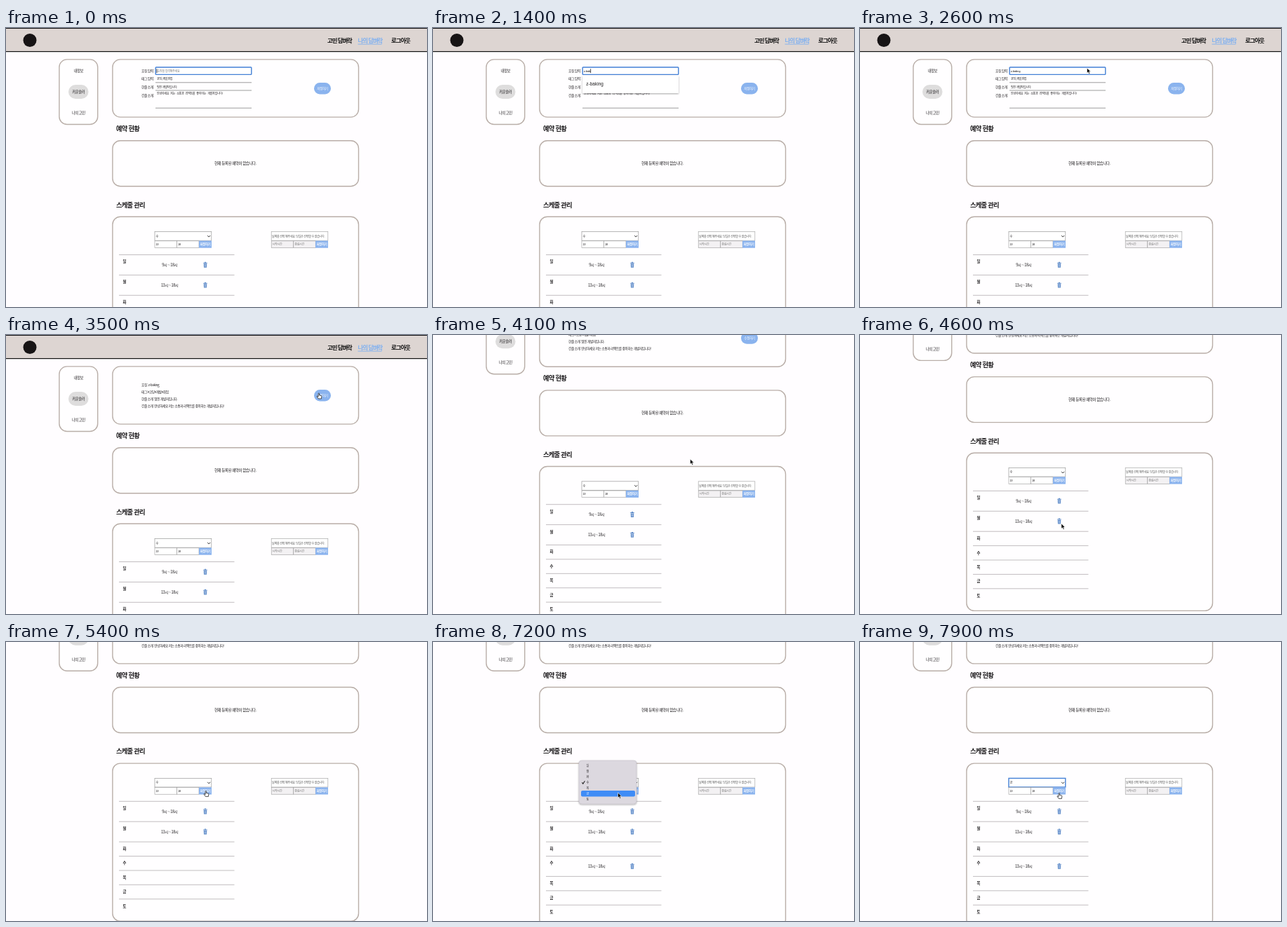
An HTML page that plays this animation: 600 px wide and 398 px high, repeating every 8 s.

```html
<!DOCTYPE html>
<html lang="ko">
<head>
<meta charset="utf-8">
<title>카운슬러 설정</title>
<style>
html, body { margin: 0; width: 100%; height: 100%; overflow: hidden; background: #fffdff; }
svg { display: block; width: 100vw; height: 100vh; }
text { font-family: "Noto Sans CJK KR", "Noto Sans CJK", "Noto Sans CJK JP", sans-serif; letter-spacing: -.08em; white-space: pre; }
.latin { font-family: "Liberation Sans", Arial, sans-serif; }
</style>
</head>
<body>
<svg id="stage" viewBox="0 0 600 398" xmlns="http://www.w3.org/2000/svg"></svg>
<script>
const LOOP = 8000, STEP = 100;
const INK = '#1c1a1c', BLUE = '#8ab3ee', FOCUS = '#4480d6', EDGE = '#b9aea8';
const NAME = 'z-baking';
const DAYS = ['일', '월', '화', '수', '목', '금', '토'];
const INTRO = '안녕하세요 저는 소통과 리액트를 좋아하는 개발자입니다!';
const $ = id => document.getElementById(id);

// y is the vertical middle of the glyphs
const text = (x, y, size, str, attr = '') =>
  `<text x="${x}" y="${y + size * .37}" font-size="${size}" fill="${INK}" ${attr}>${str}</text>`;
const rect = (x, y, w, h, attr) => `<rect x="${x}" y="${y}" width="${w}" height="${h}" ${attr}/>`;
const line = (x1, x2, y, color) => `<path d="M${x1} ${y}H${x2}" stroke="${color}" stroke-width=".8"/>`;
const card = (x, y, w, h, id = '') =>
  rect(x, y, w, h, `rx="11" fill="#fffeff" stroke="${EDGE}" stroke-width="1.4" id="${id}"`);
const group = (id, body) => `<g id="${id}">${body}</g>`;
const fill = color => `style="fill:${color}"`;
const mid = 'text-anchor="middle"';
const bold = 'font-weight="700"';

const header =
  rect(0, 0, 600, 33.5, 'fill="#ddd5d2"') +
  rect(0, 0, 600, 1, 'fill="#111"') + rect(0, 33, 600, 1.2, 'fill="#111"') +
  '<circle cx="34" cy="17.5" r="9.5" fill="#171415"/>' +
  [[458, '고민 담벼락', '#111'], [501.5, '나의 담벼락', '#7fb0f0'], [549, '로그아웃', '#111']].map(([x, str, c]) =>
    text(x, 18, 8.4, str, `font-weight="900" style="fill:${c};letter-spacing:-.12em"`)).join('') +
  rect(501.5, 22.6, 34, .9, 'fill="#7fb0f0"');

const sidebar =
  card(75.9, 44.9, 54.8, 92.6) +
  rect(89, 81, 28.5, 20, 'rx="10" fill="#dedddd"') +
  text(103.2, 61, 5.3, '내정보', mid) + text(103.2, 91, 5.3, '카운슬러', mid) + text(103.2, 121, 5.3, '나의 고민', mid);

const form = group('form',
  ['호칭 입력:', '태그 입력:', '한줄 소개:', '긴줄 소개:'].map((s, i) => text(193, 61 + i * 11.6, 4.7, s)).join('') +
  rect(213.2, 56, 136.6, 10.4, `rx=".8" fill="#fff" stroke="${FOCUS}" stroke-width="1.4"`) +
  text(215.6, 61.2, 4.1, '호칭을 입력해주세요', `id="hint" ${fill('#777')}`) +
  text(214.8, 61, 4.3, '', 'id="typed" class="latin"') +
  rect(214.6, 58.3, .8, 5.8, `fill="${INK}" id="caret"`) +
  text(215, 72.6, 4.1, '코딩,개발,취업') + text(215, 84, 4.1, '멋진 개발자입니다.') +
  text(215, 93.6, 4.1, INTRO, 'style="word-spacing:.3em"') +
  line(213, 350, 77.8, '#858585') + line(213, 350, 89, '#858585') + line(213, 350, 114.2, '#858585') +
  group('suggest',
    rect(213, 68, 137, 25, 'fill="#fff" filter="url(#soft)"') +
    text(218.3, 80, 6.4, NAME, 'class="latin" style="letter-spacing:.01em"')));

const view = group('view',
  ['호칭: ' + NAME, '태그:#코딩#개발#취업', '한줄 소개: 멋진 개발자입니다.', '긴줄 소개: ' + INTRO]
    .map((s, i) => text(193, 71 + i * 10, 4.65, s)).join(''));

const saveCell = x => rect(x, 303.5, 18, 10.2, `fill="${BLUE}"`) + text(x + 9, 308.5, 4.5, '저장하기', `${mid} ${bold} ${fill('#fff')}`);
const cell = (x, w, str, bg, color) =>
  rect(x, 303.8, w, 9.6, `fill="${bg}" stroke="#999" stroke-width=".6"`) + text(x + 1.4, 308.6, 4.1, str, fill(color));

const weekly =
  rect(212, 290.6, 80.8, 12.6, 'fill="#fff" stroke="#999" stroke-width=".7" id="select"') +
  text(213.4, 297, 4.1, '수', 'id="day"') +
  '<path d="M287.2 296l2 2.1 2-2.1" fill="none" stroke="#222" stroke-width=".9"/>' +
  cell(212, 31.6, '13', '#fff', INK) + cell(243.6, 31.4, '18', '#fff', INK) + saveCell(275);

const dated =
  rect(378.2, 290.6, 80.6, 12.6, 'fill="#fff" stroke="#aaa" stroke-width=".7"') +
  text(379, 297, 4.1, '날짜를 선택 해주세요. 당일은 선택할 수 없습니다.', fill('#555')) +
  cell(378.2, 31.6, '시작시간', '#f3f1f3', '#777') + cell(409.8, 31.4, '종료시간', '#f3f1f3', '#777') + saveCell(441);

const trash = y => `<g transform="translate(284 ${y})" fill="#5f8bc9">
  <path d="M-2.8 -3.2h5.6v1h-5.6zM-1.1 -4.2h2.2v1h-2.2zM-2.3 -1.7h4.6l-.3 5.4h-4z"/>
  <path d="M-.7 -.8v3.6M.7 -.8v3.6" stroke="#e8f0fb" stroke-width=".5"/></g>`;

function rows(times) {
  let y = 323.5;
  return DAYS.map((d, i) => {
    const top = y, slot = times[i];
    y += slot ? 28.9 : 20.4;
    return line(161, 325.5, top, '#b3aeb0') + text(168.8, top + 10, 5.3, d, `${mid} ${bold}`) +
      (slot ? text(233.2, top + 14.5, 5.5, slot, mid) + trash(top + 14.5) : '');
  }).join('');
}

const popup = group('popup',
  rect(208, 169, 82, 62, 'rx="4" fill="#dcd8df" stroke="#bdb9c0" stroke-width=".5" filter="url(#soft)"') +
  rect(211, 212, 77, 8.4, 'rx="2" fill="#3f8cf6" id="hover"') +
  DAYS.map((d, i) => text(218.6, 176.2 + i * 8, 4.1, d, `id="opt${i}"`)).join('') +
  '<path d="M212.4 200.4l1.4 1.8 2.6-4" fill="none" stroke="#222" stroke-width="1.1" id="tick"/>');

const cursor = group('cursor',
  '<path id="arrow" d="M0 0v7.2l1.7-1.5 1.2 2.7 1.3-.6-1.2-2.6h2.3z" fill="#000" stroke="#fff" stroke-width=".6"/>' +
  `<path id="hand" d="M-.9 .9Q-.9 0 -.2 0T.6 .9V3L3 3.4Q4 3.6 3.9 4.6L3.4 7.9H-.7L-2.8 5Q-3.1 4 -2.2 4.1L-.9 5.1z"
    fill="#fff" stroke="#222" stroke-width=".8" stroke-linejoin="round"/>`);

$('stage').innerHTML =
  '<defs><filter id="soft" x="-10%" y="-20%" width="120%" height="150%"><feDropShadow dx="0" dy="1" stdDeviation="1.2" flood-opacity=".35"/></filter></defs>' +
  rect(0, 0, 600, 398, 'fill="#fffdff"') +
  group('page', header + sidebar +
    card(151.9, 44.9, 350.6, 82.2) + form + view +
    rect(439, 78, 24, 16.5, `rx="8.2" fill="${BLUE}"`) +
    text(451, 86.2, 4.6, '저장하기', `id="action" ${mid} ${fill('#fff')}`) +
    text(157, 143.4, 9.3, '예약 현황', bold) +
    card(151.9, 160.7, 350.6, 65) + text(326.8, 193, 5.5, '현재 등록된 예약이 없습니다.', mid) +
    text(157, 252.2, 9.3, '스케줄 관리', bold) +
    card(151.9, 269.3, 350.6, 225, 'board') + weekly + dated + group('rows', '')) +
  popup + cursor;

const ease = p => p * p * (3 - 2 * p);
// keys: [time, ...values]
function track(keys, t) {
  let i = keys.findIndex(k => k[0] > t);
  if (i === 0) return keys[0].slice(1);
  if (i < 0) return keys[keys.length - 1].slice(1);
  const a = keys[i - 1], b = keys[i], p = ease((t - a[0]) / (b[0] - a[0]));
  return a.slice(1).map((v, j) => v + (b[j + 1] - v) * p);
}
const SCROLL = [[3600, 0], [4300, 102], [4500, 102], [4900, 96.2]];
const MOUSE = [[2500, 318, 56], [3300, 446, 83], [3800, 446, 83], [4400, 287, 271], [4500, 287, 271],
  [5400, 285, 212.5], [6300, 285, 212.5], [6600, 283, 200], [7200, 263.5, 215], [7400, 263.5, 215], [7800, 284, 215.5]];
const KEYS = [[900, 1], [1000, 2], [1100, 3], [1400, 6], [1600, 7], [1900, 8]];

const show = (id, on) => $(id).setAttribute('display', on ? 'inline' : 'none');
const set = (id, attrs) => { for (const k in attrs) $(id).setAttribute(k, attrs[k]); };
const within = (t, a, b) => t >= a && t < b;

function draw(t) {
  const [scroll] = track(SCROLL, t), [mx, my] = track(MOUSE, t);
  set('page', { transform: `translate(0 ${-scroll})` });

  const count = KEYS.reduce((n, k) => t >= k[0] ? k[1] : n, 0);
  const saved = t >= 3300;
  show('form', !saved);
  show('view', saved);
  $('action').textContent = saved ? '수정하기' : '저장하기';
  $('typed').textContent = NAME.slice(0, count);
  show('hint', !count);
  show('caret', !within(t, 200, 700) && t < 2400);
  show('suggest', within(t, 1400, 1900));
  set('caret', { x: count && !saved ? 214.9 + $('typed').getComputedTextLength() : 214.6 });

  const added = t >= 5600;
  $('rows').innerHTML = rows(['9시 ~ 18시', '13시 ~ 18시', '', added ? '13시 ~ 18시' : '']);
  set('board', { height: added ? 233.7 : 225.2 });

  const open = within(t, 6700, 7500), focused = t >= 7500;
  show('popup', open);
  const pick = Math.max(3, Math.min(5, Math.round((my - 176) / 8)));
  set('hover', { y: 172 + pick * 8 });
  DAYS.forEach((d, i) => { $('opt' + i).style.fill = i === pick ? '#fff' : INK; });
  set('tick', { stroke: pick === 3 ? '#fff' : '#222' });
  $('day').textContent = focused ? '금' : '수';
  set('select', { stroke: focused ? FOCUS : '#999', 'stroke-width': focused ? 1.4 : .7 });

  const hand = within(t, 3200, 3900) || within(t, 5300, 6400) || t >= 7800;
  show('cursor', t >= 2600);
  show('hand', hand);
  show('arrow', !hand);
  set('cursor', { transform: `translate(${mx} ${my})` });
}

const start = performance.now();
function tick() {
  const t = (performance.now() - start) % LOOP;
  draw(Math.floor(t / STEP) * STEP);
  requestAnimationFrame(tick);
}
tick();
</script>
</body>
</html>
```
